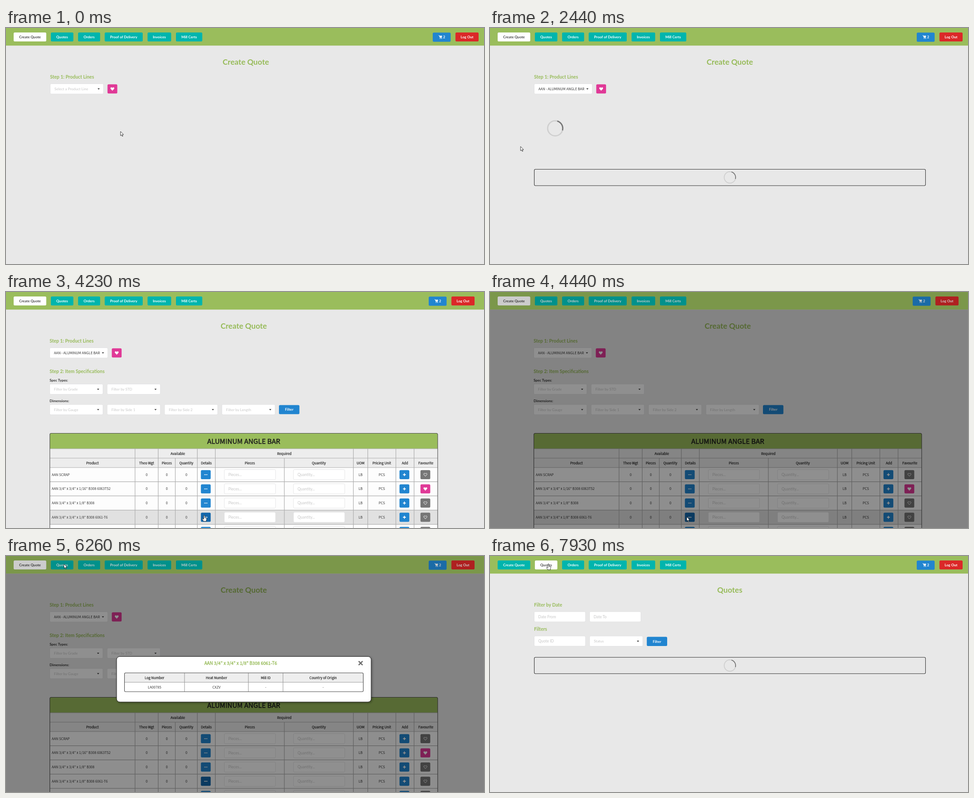
An HTML page that plays this animation: 1063x527 px, repeating every 7990 ms.

```html
<!DOCTYPE html>
<html lang="en">
<head>
<meta charset="utf-8">
<title>Create Quote</title>
<style>
html, body { margin: 0; width: 100%; height: 100%; overflow: hidden; background: #e8e8e8; }
svg { display: block; width: 1063px; height: 527px; }
text { font-family: Lato, sans-serif; font-size: 8.15px; fill: #333; }
.mid { text-anchor: middle; }
.title { font-size: 17.1px; font-weight: 700; fill: #97bb59; }
.step { font-size: 10.4px; font-weight: 700; fill: #97bb59; }
.label { font-size: 7.9px; font-weight: 700; }
.btn { font-size: 8px; font-weight: 700; fill: #fff; }
.on { fill: #444; }
.hint { fill: #c6c6c6; }
.field { font-size: 8.5px; }
.cell, .head, .band, .name { font-family: "Noto Sans CJK SC", "Noto Sans CJK JP", "Noto Sans CJK", sans-serif; font-size: 7.6px; }
.head { fill: #222; stroke: #222; stroke-width: .22px; }
.band { font-size: 15.2px; fill: #1c1c1c; stroke: #1c1c1c; stroke-width: .5px; }
.name { font-size: 9.85px; fill: #97bb59; stroke: #97bb59; stroke-width: .4px; }
</style>
</head>
<body>
<svg id="stage" viewBox="0 0 1063 527"></svg>
<script>
const LOOP = 7990;
const GREEN = '#9abd5c', TEAL = '#00b5ad', BLUE = '#2185d0', PINK = '#e03997', GREY = '#767676';
const $ = id => document.getElementById(id);

const rect = (x, y, w, h, fill, r = 0, extra = '') =>
  `<rect x="${x}" y="${y}" width="${w}" height="${h}" rx="${r}" fill="${fill}" ${extra}/>`;
const text = (x, y, s, cls) => `<text x="${x}" y="${y}" class="${cls}">${s}</text>`;
const path = (d, fill, extra = '') => `<path d="${d}" fill="${fill}" ${extra}/>`;
const group = (id, body) => `<g id="${id}">${body}</g>`;
const at = (x, y, body) => `<g transform="translate(${x} ${y})">${body}</g>`;

const button = (x, y, w, h, fill, label, cls = '') =>
  rect(x, y, w, h, fill, 2.5) + text(x + w / 2, y + h / 2 + 2.8, label, 'btn mid ' + cls);
const box = (x, y, w, h) =>
  rect(x, y, w, h, '#fff', 2.4, 'stroke="#dcdcdd" stroke-width=".7"');
const input = (x, y, w, label) => box(x, y, w, 22.6) + text(x + 9, y + 14.3, label, 'hint field');
const caret = (x, y) => path(`M${x - 2.5} ${y - 1.2}h5l-2.5 2.8z`, '#333');
const select = (x, y, w, label, cls = 'hint') =>
  box(x, y, w, 22.8) + text(x + 9.5, y + 14.4, label, cls) + caret(x + w - 10.7, y + 11.5);

const HEART = 'M0 4.1L-3.8-.1C-5.4-2.4-2.4-4.9 0-2.3C2.4-4.9 5.4-2.4 3.8-.1Z';
const heartButton = (x, y, liked) => at(x, y, rect(-10.9, -10.2, 21.8, 20.4, liked ? PINK : GREY, 2.5) +
  (liked ? path(HEART, '#fff') : path(HEART, 'none', 'stroke="#fff" stroke-width="1.1" transform="scale(.88)"')));

function nav(active) {
  const tabs = [['Create Quote', 17, 72.5], ['Quotes', 99.8, 50], ['Orders', 160.3, 49],
    ['Proof of Delivery', 219.5, 84.5], ['Invoices', 314.8, 52.5], ['Mill Certs', 378, 58.5]];
  return tabs.map(([s, x, w]) => s === active
    ? button(x, 10, w, 20, '#fff', s, 'on') : button(x, 10, w, 20, TEAL, s)).join('');
}

function account() {
  const cart = path('M962 17h1.8l1.4 4.6h4.2', 'none', 'stroke="#fff" stroke-width="1"') +
    path('M963.9 17.3h6l-.9 3.5h-4.2z', '#fff') +
    '<circle cx="965.5" cy="23.3" r=".9" fill="#fff"/><circle cx="968.8" cy="23.3" r=".9" fill="#fff"/>';
  return rect(949, 10.3, 39.8, 20.4, BLUE, 2.5) + cart + text(972, 23.4, '2', 'btn') +
    button(999.5, 10, 51.5, 20, '#db2828', 'Log Out');
}

const ring = (id, x, y, r, w) => {
  const q = r * Math.SQRT1_2;
  return at(x, y, `<circle r="${r}" fill="none" stroke="#cfcfcf" stroke-width="${w}"/>` +
    group(id, path(`M${-q} ${-q}A${r} ${r} 0 0 1 ${q} ${-q}`, 'none', `stroke="${GREY}" stroke-width="${w}"`)));
};
const frame = y => rect(98.5, y, 870, 36.5, 'none', 2.5, 'stroke="#333" stroke-width="1.1"');

function menu() {
  const kinds = ['AAN|ANGLE BAR', 'ACH|CHANNEL', 'AFL|FLAT BAR', 'APL|PLATE', 'ARD|ROUND BAR', 'ASH|SHEET'];
  const items = kinds.map((k, i) => {
    const [code, kind] = k.split('|'), y = 147 + i * 31;
    return (i ? '' : `<rect id="picked" x="98.5" y="147.5" width="118" height="30.5" fill="#f2f2f2"/>`) +
      text(107.5, y + 13.5, code + ' - ALUMINUM', 'cell') + text(107.5, y + 23.5, kind, 'cell');
  }).join('');
  return '<clipPath id="roll"><rect id="rollBox" x="97" y="147" width="122" height="170"/></clipPath>' +
    `<g clip-path="url(#roll)">${rect(98, 147, 119, 169.5, '#fff', 2, 'stroke="#96c8da" stroke-width=".7"')}` +
    `<g clip-path="inset(0)">${items}</g></g>`;
}

const COLS = [97.5, 287, 338.5, 376.5, 425.5, 465.5, 619, 772.5, 804.5, 867, 907.5, 960];
const ROW = 31.7, TOP = 392;
const mid = (a, b = a + 1) => (COLS[a] + COLS[b]) / 2;

function table() {
  const names = ['AAN SCRAP', 'AAN 3/4" x 3/4" x 1/16" B308 6063T52', 'AAN 3/4" x 3/4" x 1/8" B308',
    'AAN 3/4" x 3/4" x 1/8" B308 6061-T6', ''];
  const heads = ['Product', 'Theo Wgt', 'Pieces', 'Quantity', 'Details', 'Pieces', 'Quantity', 'UOM',
    'Pricing Unit', 'Add', 'Favourite'];
  let s = rect(97.5, 350, 862.5, 42, '#ededed') + rect(97.5, TOP, 862.5, 140, '#fdfdfd') +
    `<rect id="hover" x="97.5" width="862.5" height="${ROW}" fill="#e1e1e1"/>` +
    path('M97.5 350V318.500q0-3 3-3H957q3 0 3 3V350z', GREEN) +
    text(528.7, 338.7, 'ALUMINUM ANGLE BAR', 'band mid') +
    text(mid(2, 4), 363.8, 'Available', 'head mid') + text(mid(5, 7), 363.8, 'Required', 'head mid');
  heads.forEach((h, i) => s += text(mid(i), 384.6, h, 'head mid'));
  let lines = 'M97.5 350H960M97.5 371H960';
  for (let i = 0; i < 5; i++) lines += `M97.5 ${TOP + i * ROW}H960`;
  COLS.slice(1, -1).forEach((x, i) => lines += `M${x} ${i === 2 || i === 5 ? 371 : 350}V527`);
  s += path(lines, 'none', 'stroke="#adadad" stroke-width="1.2"');
  names.forEach((name, i) => {
    const y = TOP + 15.9 + i * ROW, b = y + 2.8;
    s += text(101.7, b, name, 'cell');
    [1, 2, 3].forEach(c => s += text(mid(c), b, '0', 'cell mid'));
    s += at(444.3, y, `<rect ${i === 3 ? 'id="pressed"' : ''} x="-10.9" y="-10.2" width="21.8" height="20.4" rx="2.5" fill="${BLUE}"/>` +
      [-2.6, 0, 2.6].map(x => rect(x - .9, -.9, 1.8, 1.8, '#fff', .5)).join(''));
    s += input(485.5, y - 11.3, 114, 'Pieces...') + input(639.3, y - 11.3, 114, 'Quantity...');
    s += text(mid(7), b, 'LB', 'cell mid') + text(mid(8), b, 'PCS', 'cell mid');
    s += at(886, y, rect(-10.9, -10.2, 21.8, 20.4, BLUE, 2.5) + path('M-3.2 0H3.2M0-3.2V3.2', 'none', 'stroke="#fff" stroke-width="1.8"'));
    s += heartButton(932.6, y, i === 1);
  });
  return s + path('M97.5 530V318.500q0-3 3-3H957q3 0 3 3V530', 'none', 'stroke="#4a4a4a" stroke-width="1.1"');
}

function specs() {
  const row = (y, labels) => labels.map((s, i) => select(97.3 + i * 127.6, y, 118.3, 'Filter by ' + s)).join('');
  return text(97, 181.300, 'Step 2: Item Specifications', 'step') +
    text(97, 200.3, 'Spec Types:', 'label') + row(205.6, ['Grade', 'STD']) +
    text(97, 245.7, 'Dimensions:', 'label') + row(251.2, ['Gauge', 'Side 1', 'Side 2', 'Length']) +
    button(607, 252.5, 45.5, 20.3, BLUE, 'Filter');
}

function quotes() {
  return text(533.3, 82, 'Quotes', 'title mid') +
    text(98, 113.3, 'Filter by Date', 'step') + input(98.3, 124.3, 114, 'Date From') + input(221.500, 124.3, 114, 'Date To') +
    text(98, 167, 'Filters', 'step') + input(98.3, 178.7, 114, 'Quote ID') + select(221.500, 178.8, 118.3, 'Status') +
    button(348.7, 180.6, 45.3, 20.3, BLUE, 'Filter') + frame(226.300) + ring('spinC', 533.5, 244.6, 12.7, 1.8);
}

function modal() {
  const xs = [263.5, 397, 539, 616, 794.5];
  const heads = ['Log Number', 'Heat Number', 'Mill ID', 'Country of Origin'], vals = ['LA00785', 'CXZV', '-', '-'];
  let s = rect(246, 224.500, 566, 101.5, '#fff', 7, 'stroke="#222" stroke-width="1" filter="url(#soft)"') +
    text(522, 242.9, 'AAN 3/4" x 3/4" x 1/8" B308 6061-T6', 'name mid') +
    path('M784.2 234.800l8.800 8.800m0-8.800l-8.800 8.800', 'none', 'stroke="#6b6b6b" stroke-width="2.6"') +
    rect(263.5, 261, 531, 21, '#eee', 2);
  heads.forEach((h, i) => {
    const x = (xs[i] + xs[i + 1]) / 2;
    s += text(x, 274.5, h, 'head mid') + text(x, 295.6, vals[i], 'cell mid');
  });
  return s + path('M263.5 282H794.5M397 261V303M539 261V303M616 261V303', 'none', 'stroke="#999" stroke-width="1.1"') +
    rect(263.5, 261, 531, 42, 'none', 2.5, 'stroke="#444" stroke-width="1.1"');
}

const PEN = 'stroke="#111" stroke-width=".8" stroke-linejoin="round"';
$('stage').innerHTML =
  '<defs><filter id="soft" x="-10%" y="-30%" width="120%" height="160%"><feDropShadow dx="1.500" dy="1.500" stdDeviation="2.500" flood-opacity=".4"/></filter></defs>' +
  rect(0, 0, 1063, 527, '#e8e8e8') + rect(0, 0, 1063, 39.3, GREEN) +
  group('navCreate', nav('Create Quote')) + group('navQuotes', nav('Quotes')) + group('account', account()) +
  group('create',
    `<text id="heading" y="82" class="title mid">Create Quote</text>` +
    group('lines', text(98, 113.3, 'Step 1: Product Lines', 'step') +
      group('empty', select(98.3, 124.500, 118.5, 'Select a Product Line') + heartButton(236.6, 136, true)) +
      group('chosen', select(98.3, 124.500, 129, 'AAN - ALUMINUM ANGLE BAR', 'cell') + heartButton(247.2, 136, true))) +
    group('menu', menu()) +
    group('loading', ring('spinA', 145, 224, 16.8, 2.8) + frame(315.500) + ring('spinB', 533.5, 333.600, 12.7, 1.8)) +
    group('result', specs() + table())) +
  group('quotes', quotes()) +
  group('dim', rect(0, 0, 1063, 39.3, '#000', 0, 'opacity=".2"') + rect(0, 39.3, 1063, 488, '#000', 0, 'opacity=".44"')) +
  group('modal', modal()) +
  group('arrow', path('M0 0V9.500L2.200 7.500L3.800 11L5.300 10.300L3.800 7H6.700Z', '#fff', PEN)) +
  group('hand', path('M-1.200 .9a1.200 1.200 0 0 1 2.400 0V5l3 .8q1.300.4 1.100 1.800l-.8 3.200V13H-1.600L-4.200 8.800q-.6-1.500.7-1.800l2.300 1.500Z', '#fff', PEN));

// Pointer: time, x, y
const TRACK = [[0, 254.7, 231], [309, 254.7, 231], [310, 252.7, 228.7], [410, 252.7, 228.7], [900, 185, 136],
  [1150, 185, 138], [1450, 165, 162], [1700, 160, 165], [2250, 62, 258], [2440, 68, 264.5], [2500, 67.5, 272],
  [2540, 70, 275], [3300, 350, 481], [3360, 350, 481], [3960, 441, 499], [4439, 441, 499], [4440, 437.5, 502],
  [4640, 437.5, 502], [5230, 375.5, 352.5], [5470, 337, 240], [6260, 129, 18], [6869, 129, 18],
  [6870, 130, 17.8], [LOOP, 130, 17.8]];

function pointer(t) {
  const i = Math.max(1, TRACK.findIndex(k => k[0] > t));
  const [t0, x0, y0] = TRACK[i - 1], [t1, x1, y1] = TRACK[i];
  const p = (t - t0) / (t1 - t0);
  return [x0 + (x1 - x0) * p, y0 + (y1 - y0) * p];
}

const show = (id, on) => $(id).setAttribute('display', on ? 'inline' : 'none');
const turn = (id, ms) => $(id).setAttribute('transform', `rotate(${ms / 600 * 360 % 360})`);

function draw(t) {
  const span = (a, b) => t >= a && t < b;
  const onQuotes = t >= 7190, wide = span(2500, 7190), picked = t >= 1500;
  show('navCreate', !onQuotes);
  show('navQuotes', onQuotes);
  show('create', !onQuotes);
  show('quotes', onQuotes);
  $('account').setAttribute('transform', `translate(${wide ? -9 : 0} 0)`);
  $('heading').setAttribute('x', wide ? 528.7 : 533.3);
  $('lines').setAttribute('transform', `translate(${wide ? -1 : 0} 0)`);
  show('empty', !picked);
  show('chosen', picked);
  show('menu', span(1050, 1550));
  const roll = Math.min((t - 1050) / 200, (1550 - t) / 50, 1);
  $('rollBox').setAttribute('height', Math.max(0, 170 * roll));
  show('loading', span(1730, 2500));
  show('result', wide);
  turn('spinA', t - 1740);
  turn('spinB', t - 1740);
  turn('spinC', t - 7230 + 600);

  const [x, y] = pointer(t);
  const row = Math.floor((y - TOP) / ROW);
  show('hover', span(2500, 4690) && row >= 0 && x > 97);
  $('hover').setAttribute('y', TOP + row * ROW);
  show('picked', y > 147);
  $('pressed').setAttribute('fill', span(4230, 6870) ? '#1467ab' : span(3900, 4230) ? '#1678c2' : BLUE);
  show('dim', span(4440, 6870));
  show('modal', span(4690, 6870));

  const hand = span(850, 1700) || span(3910, 4440) || t >= 6870;
  show('arrow', !hand);
  show('hand', hand);
  $(hand ? 'hand' : 'arrow').setAttribute('transform', `translate(${x} ${y})`);
}

function tick() {
  draw(performance.now() % LOOP);
  requestAnimationFrame(tick);
}
tick();
</script>
</body>
</html>
```
